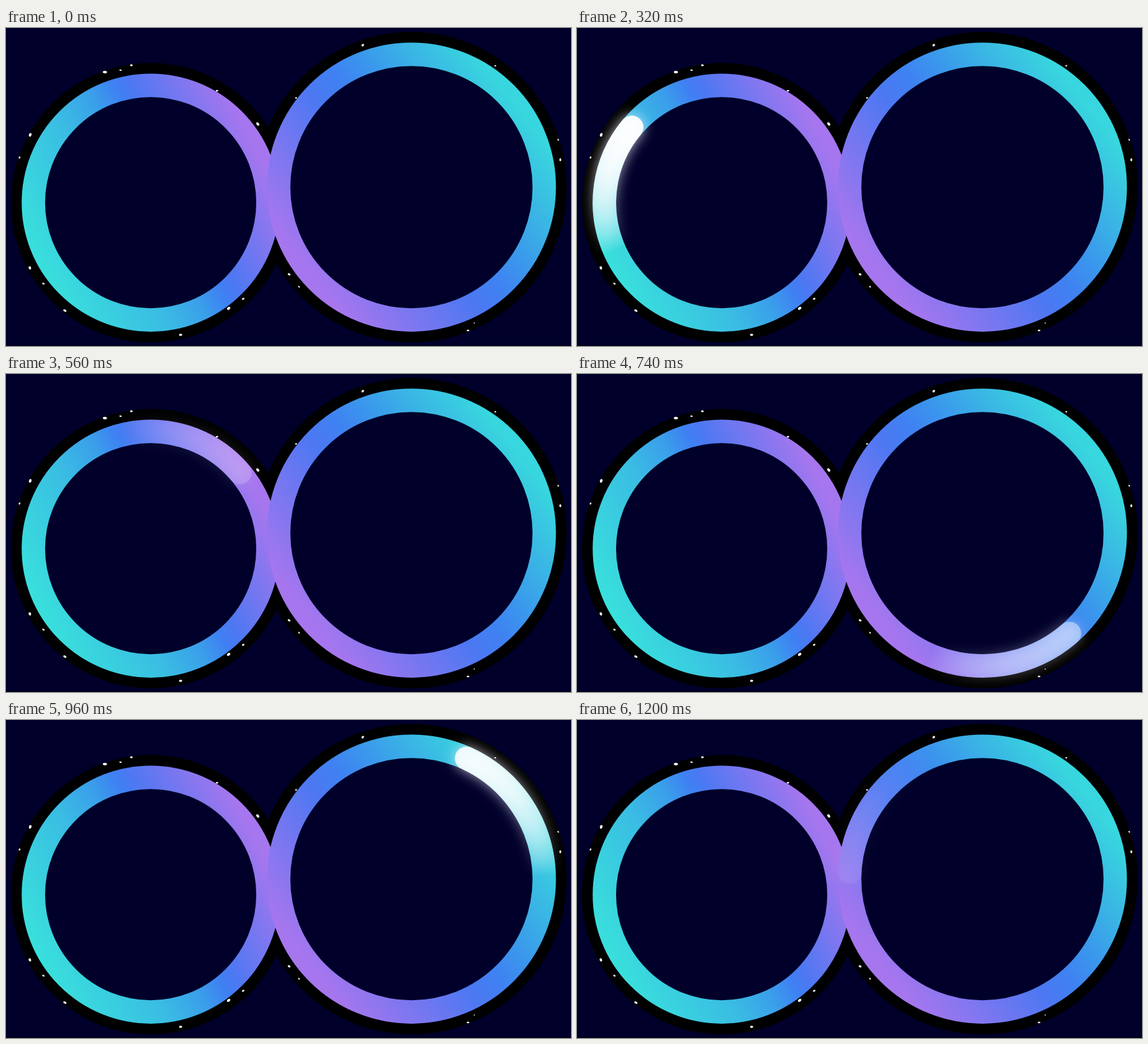
These frames come from a looping animation (910 px wide and 512 px high, 1.22 s). An HTML page with a canvas:

```html
<!DOCTYPE html>
<html lang="en">
<head>
<meta charset="utf-8">
<title>Infinity loop</title>
<style>
  html, body { margin: 0; width: 100%; height: 100%; overflow: hidden; background: #00002b; }
  canvas { display: block; }
</style>
</head>
<body>
<canvas width="910" height="512"></canvas>
<script>
const ctx = document.querySelector('canvas').getContext('2d');
const LOOP = 1220, STEP = 20, BAND = 37.7, RIM = 17.3, TAIL = 64;
const rad = deg => deg * Math.PI / 180;

// axis: unit direction of the colour ramp; stops: [distance from centre, colour]
// sweep: head angle in degrees = a + b*t + c*t*t
const rings = [
  {
    x: 233, y: 281.2, r: 188.9, dir: 1, start: 0, axis: [0.887, -0.46],
    sweep: [73.7, 0.481, -0.000075],
    stops: [[-208, '#39e0dc'], [-70, '#3abde3'], [-5, '#3a9fea'], [36, '#3f80f3'], [58, '#4c78f2'], [190, '#a676ee']]
  },
  {
    x: 653, y: 256.2, r: 213.9, dir: -1, start: LOOP / 2, axis: [0.79, -0.61],
    sweep: [-122.2, 0.5785, -0.000121],
    stops: [[-214, '#a676ee'], [-35, '#4c78f2'], [15, '#3f82f2'], [68, '#3a98ec'], [128, '#3ab3e5'], [214, '#38d6de']]
  }
];

// x, y, radius x, radius y, tilt
const stars = [
  [159.3, 71, 3.4, 1.9, 5], [184.5, 67.8, 2, 1.1, 10], [202, 60, 2.1, 1.4, 10],
  [339.8, 101, 2, 1.3, 0], [405.5, 154.5, 2, 3, -35], [39, 172, 2, 3, 20],
  [21.8, 208.5, 1.3, 1.8, 30], [38.4, 386.2, 1.9, 2.7, -20], [60.3, 411.6, 2, 1.4, 30],
  [94.8, 455, 2.7, 1.7, 25], [281.2, 494, 2.6, 1.8, 0], [358.6, 451.4, 3, 2, -40],
  [382, 436, 2.1, 1.4, -30], [574.6, 27.6, 2.3, 1.7, -40], [788, 60.8, 1.6, 1.1, 0],
  [467.2, 112.5, 1.5, 1.3, 0], [889.4, 180, 1.1, 1.6, -30], [892.8, 212.2, 1.5, 2.4, 0],
  [456, 396.6, 2.4, 1.6, 30], [472, 416.6, 1, 1.7, -40], [744.2, 487, 2.2, 1.2, 0],
  [754.2, 475, 1.2, 0.8, 0]
];

function circle(x, y, r) {
  ctx.beginPath();
  ctx.arc(x, y, r, 0, 2 * Math.PI);
}

function drawRim({ x, y, r }) {
  circle(x, y, r + RIM / 2);
  ctx.lineWidth = BAND + RIM;
  ctx.strokeStyle = '#000';
  ctx.stroke();
}

function drawBand({ x, y, r, axis: [ax, ay], stops }) {
  const from = stops[0][0], to = stops[stops.length - 1][0];
  const ramp = ctx.createLinearGradient(x + ax * from, y + ay * from, x + ax * to, y + ay * to);
  for (const [d, colour] of stops) ramp.addColorStop((d - from) / (to - from), colour);
  circle(x, y, r);
  ctx.lineWidth = BAND;
  ctx.strokeStyle = ramp;
  ctx.stroke();
}

function drawComet({ x, y, r, dir, start, sweep: [a, b, c] }, time) {
  const t = time - start, half = LOOP / 4;
  const strength = 1 - Math.abs(t - half) / half;
  if (strength <= 0) return;
  const head = a + b * t + c * t * t;

  ctx.save();
  circle(x, y, r + BAND / 2 + RIM);
  ctx.clip();
  ctx.translate(x, y);
  ctx.scale(1, dir);
  const fade = ctx.createConicGradient(rad(head - TAIL), 0, 0);
  for (let k = 0; k <= 1; k += 0.125) {
    fade.addColorStop(k * TAIL / 360, `rgba(255,255,255,${1 - (1 - k) ** 2})`);
  }
  fade.addColorStop(0.6, '#fff');
  fade.addColorStop(0.61, 'rgba(255,255,255,0)');
  ctx.globalAlpha = strength;
  ctx.lineCap = 'round';
  ctx.lineWidth = BAND;
  ctx.strokeStyle = fade;
  ctx.shadowColor = 'rgba(255,245,255,0.8)';
  ctx.shadowBlur = 20;
  ctx.beginPath();
  ctx.arc(0, 0, r, rad(head - TAIL), rad(head));
  ctx.stroke();
  ctx.restore();
}

function draw(time) {
  ctx.fillStyle = '#00002b';
  ctx.fillRect(0, 0, 910, 512);
  ctx.fillStyle = '#000012';
  ctx.fillRect(0, 510.5, 910, 1.5);
  rings.forEach(drawRim);
  for (const ring of rings) {
    drawBand(ring);
    drawComet(ring, time);
  }
  ctx.fillStyle = '#fff';
  for (const [x, y, rx, ry, tilt] of stars) {
    ctx.beginPath();
    ctx.ellipse(x, y, rx, ry, rad(tilt), 0, 2 * Math.PI);
    ctx.fill();
  }
}

function tick() {
  draw(Math.floor(performance.now() % LOOP / STEP) * STEP);
  requestAnimationFrame(tick);
}
tick();
</script>
</body>
</html>
```
